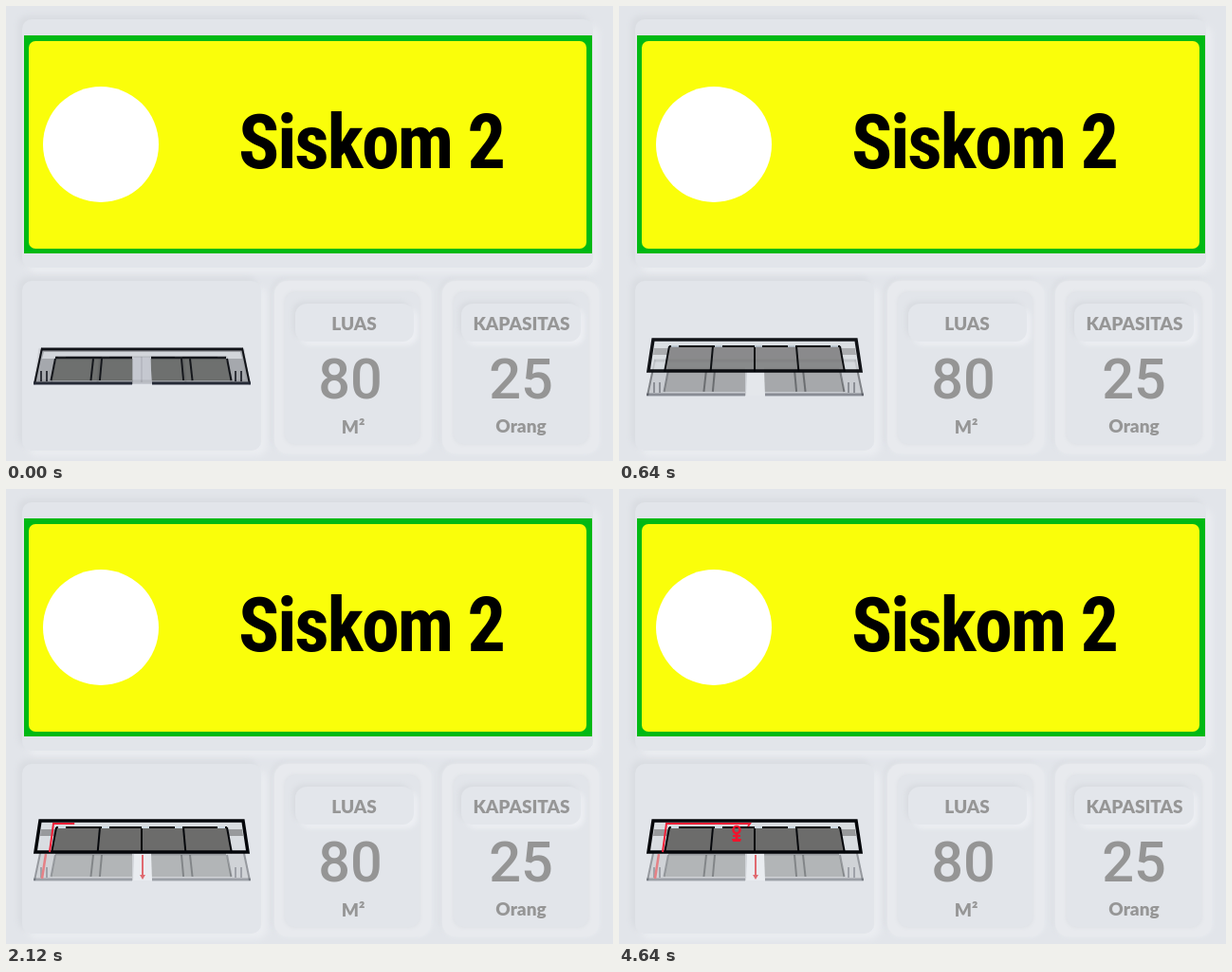
These frames come from a looping animation (640 by 480 pixels, 5080 ms). An HTML page with a canvas:

```html
<!DOCTYPE html>
<html lang="id">
<head>
<meta charset="utf-8">
<title>Siskom 2</title>
<style>
html, body { margin: 0; width: 100%; height: 100%; overflow: hidden; background: #e2e5ea; }
div, canvas, svg { position: absolute; box-sizing: border-box; }
canvas, svg { left: 0; top: 0; }
.card { border-radius: 10px; background: #e2e5ea; box-shadow: -4px -4px 6px #d9dce1, 6px 6px 7px #ebedf1; }
.frame { border-radius: 14px; background: #e8eaee; box-shadow: 0 0 5px #eceef2, -3px -3px 5px #d9dce1; }
.inner { border-radius: 10px; background: #e2e5ea; box-shadow: 0 0 4px #dadde2; }
.pill { border-radius: 12px; background: #e3e6eb; box-shadow: -3px -3px 5px #d9dce1, 4px 4px 5px #edeff3; }
.sign { left: 19px; top: 30.5px; width: 599px; height: 230.5px; background: #00b914; }
.sign div { inset: 6px 6px 5px 5px; border-radius: 7px; background: #fafe0a; }
text { text-anchor: middle; }
.title { font: 600 80px "Roboto Condensed", Roboto, sans-serif; font-stretch: condensed; letter-spacing: -2px; }
.label { font: 900 19px Lato, sans-serif; fill: #969696; }
.value { font: 500 59.5px Roboto, sans-serif; fill: #959595; }
</style>
</head>
<body>
<div class="card" style="left:17px;top:14px;width:602px;height:262px"></div>
<div class="card" style="left:17px;top:290px;width:252px;height:179px"></div>
<div class="frame" style="left:283px;top:290px;width:165px;height:182px"></div>
<div class="inner" style="left:294px;top:302px;width:142px;height:160px"></div>
<div class="pill" style="left:305px;top:314px;width:125px;height:40px"></div>
<div class="frame" style="left:460px;top:290px;width:165px;height:182px"></div>
<div class="inner" style="left:472px;top:302px;width:142px;height:160px"></div>
<div class="pill" style="left:480px;top:314px;width:126px;height:40px"></div>
<div class="sign"><div></div></div>
<svg width="640" height="480">
  <circle cx="100" cy="146" r="61" fill="#fff"/>
  <text class="title" x="385" y="171">Siskom 2</text>
  <g class="label">
    <text x="367" y="341.5">LUAS</text>
    <text x="543.5" y="341.5">KAPASITAS</text>
    <text x="366" y="451">M²</text>
    <text x="543" y="450">Orang</text>
  </g>
  <g class="value">
    <text x="363" y="414">80</text>
    <text x="543" y="414">25</text>
  </g>
</svg>
<canvas id="view" width="640" height="480"></canvas>
<script>
const ctx = document.getElementById('view').getContext('2d');
const LOOP = 5080;
const mix = (a, b, k) => a + (b - a) * k;
const phase = (t, from, to) => Math.min(1, Math.max(0, (t - from) / (to - from)));

function trace(points) {
  ctx.beginPath();
  points.forEach(([x, y]) => ctx.lineTo(x, y));
}

function fill(color, ...points) {
  trace(points);
  ctx.fillStyle = color;
  ctx.fill();
}

function line(color, width, ...points) {
  trace(points);
  ctx.strokeStyle = color;
  ctx.lineWidth = width;
  ctx.stroke();
}

// A room whose side walls lean with the view; x values are at back and front
function room(color, y0, y1, l0, l1, r0, r1) {
  fill(color, [l0, y0], [r0, y0], [r1, y1], [l1, y1]);
}

function groundFloor(y) {
  const b = y + 38;
  room('#a5a8ad', y, b, 37, 29, 250, 258);
  room('#d2d5da', y + 4, y + 11, 40, 38, 247, 249);
  room('#6e706f', y + 11, b - 4, 53, 48, 133, 133);
  room('#6e706f', y + 11, b - 4, 153, 153, 232, 238);
  room('#c5c8d0', y + 9, b, 134, 134, 152, 154);
  line('#15171c', 2.5, [52, y + 10], [133, y + 10]);
  line('#15171c', 2.5, [153, y + 10], [232, y + 10]);
  for (const x of [52, 92, 101, 185, 194, 233]) {
    const lean = (x - 143) * 0.05;
    line('#15171c', 2, [x, y + 11], [x + lean, b - 4]);
  }
  for (const x of [37, 43, 242, 248]) line('#30333b', 2, [x, y + 24], [x, b - 3]);
  line('#12141a', 3, [37, y + 1], [250, y + 1]);
  line('#12141a', 2, [38, y], [30, b]);
  line('#12141a', 2, [249, y], [257, b]);
  line('#262b38', 3, [29, b - 1], [133, b - 1]);
  line('#262b38', 3, [154, b - 1], [258, b - 1]);
}

function upperRooms(y) {
  const b = y + 36;
  room('#d9dde1', y, b, 36, 30, 250, 256);
  room('#989a9c', y + 11, y + 18, 37, 36, 53, 52);
  room('#989a9c', y + 11, y + 18, 233, 234, 249, 250);
  room('#6c6c6b', y + 9, b, 53, 48, 233, 238);
}

function upperWalls(y) {
  const b = y + 36;
  line('#05070b', 2, [53, y + 9], [233, y + 9]);
  for (const x of [53, 99, 143, 187, 233]) {
    line('#05070b', 2, [x, y + 9], [x + (x - 143) * 0.055, b]);
  }
  for (const x of [59, 105, 147, 182, 227]) line('#cfdbe5', 2, [x - 4, y + 9], [x + 4, y + 9]);
  trace([[36, y + 2], [250, y + 2], [255, b - 1], [31, b - 1]]);
  ctx.closePath();
  ctx.strokeStyle = '#04060a';
  ctx.lineWidth = 3.5;
  ctx.stroke();
}

// Draws the first part of a route, measured by length
function route(points, k, color, width) {
  const size = (a, b) => Math.hypot(b[0] - a[0], b[1] - a[1]);
  let left = k * points.slice(1).reduce((sum, p, i) => sum + size(points[i], p), 0);
  const part = [points[0]];
  for (let i = 1; i < points.length && left > 0; i++) {
    const [a, b] = [points[i - 1], points[i]];
    const s = Math.min(1, left / size(a, b));
    part.push([mix(a[0], b[0], s), mix(a[1], b[1], s)]);
    left -= size(a, b);
  }
  if (k > 0) line(color, width, ...part);
}

function pin(k) {
  if (!k) return;
  ctx.save();
  ctx.globalAlpha = k;
  ctx.translate(124, 371);
  ctx.scale(k, k);
  ctx.beginPath();
  ctx.arc(0, -11.5, 3.6, 0, 7);
  ctx.strokeStyle = '#f0142c';
  ctx.lineWidth = 2.4;
  ctx.stroke();
  line('#f0142c', 3, [0, -8], [0, -1]);
  line('#f0142c', 2, [-4, -5], [4, -5]);
  fill('#f0142c', [-5, -2], [5, -2], [4, 1], [-4, 1]);
  ctx.restore();
}

function draw(t) {
  const p = phase(t, 0, 750);
  const low = mix(361, 375, p);
  const high = mix(361, 348, p);
  ctx.clearRect(0, 0, 640, 480);
  ctx.globalAlpha = mix(1, 0.3, p);
  groundFloor(low);
  ctx.globalAlpha = p;
  room('#e9ecf0', low + 10, low + 38, 135, 134, 153, 154);
  ctx.globalAlpha = 1;
  const entry = phase(t, 800, 920);
  route([[144, 386], [144, 410]], entry, '#e06a70', 2);
  if (entry === 1) fill('#e06a70', [141, 407], [147, 407], [144, 412]);
  route([[38, 411], [42, 385]], phase(t, 920, 1040), '#e58186', 2.5);

  // Walls show early, surfaces late
  ctx.globalAlpha = p * p;
  upperRooms(high);
  ctx.globalAlpha = p ** 0.4;
  upperWalls(high);
  ctx.globalAlpha = 1;
  route([[46, 383], [50, 353], [138, 353], [136, 356]], phase(t, 1880, 2440), '#f02038', 2);
  pin(phase(t, 2480, 2680));
}

function tick(now) {
  draw(now % LOOP);
  requestAnimationFrame(tick);
}
requestAnimationFrame(tick);
</script>
</body>
</html>
```
